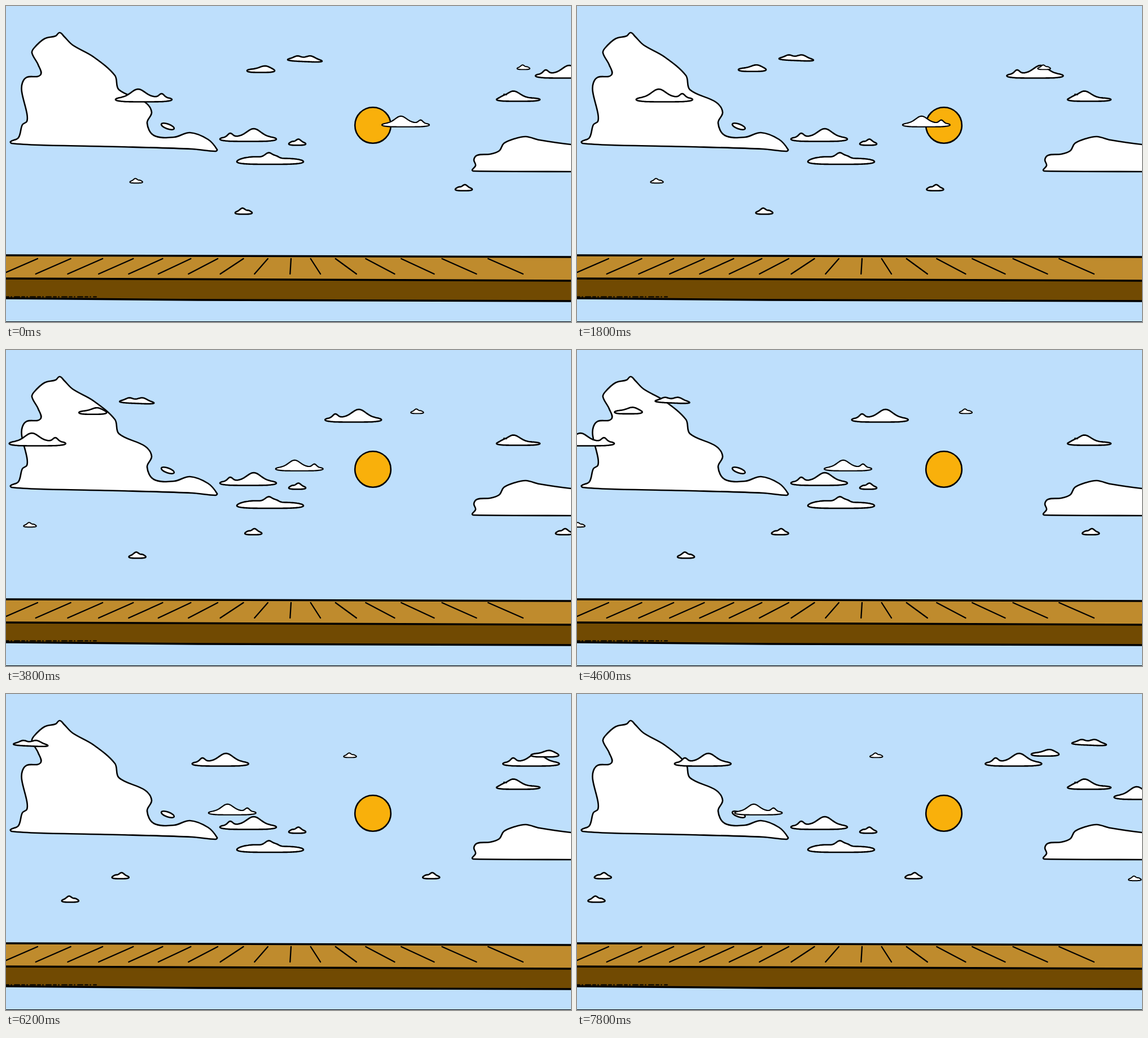
Animation, 1001 px wide and 559 px high, one loop 8 s. Source, as an HTML page:

```html
<!DOCTYPE html>
<html lang="en">
<head>
<meta charset="utf-8">
<title>Drifting clouds</title>
<style>
  html, body { margin: 0; width: 100%; height: 100%; overflow: hidden; background: #bedffc; }
  svg { display: block; width: 100%; height: 100%; }
</style>
</head>
<body>
<svg id="stage" viewBox="0 0 1001 559" fill="#fff" stroke="#000" stroke-width="2.6"
  stroke-linecap="round" stroke-linejoin="round"></svg>
<script>
const LOOP = 8000, STEP = 200;

// Small clouds: a slab `rim` above and `sag` below its base line, plus bumps [centre, height, spread].
const kinds = {
  twin: { width: 100, rim: 4.5, sag: 4, bumps: [[18, 7, 6], [60, 14, 17]] },
  puff: { width: 30, rim: 3, sag: 2.2, bumps: [[6, 1.5, 4], [17, 5.5, 6]] },
  flat: { width: 118, rim: 6, sag: 4.5, bumps: [[28, 3, 30], [57, 9, 9], [70, 3, 6]] },
  hat: { width: 77, rim: 3, sag: 3, bumps: [[10, 2, 7], [30, 12, 16]] },
  sliver: { width: 49, rim: 3, sag: 3, bumps: [[32, 5.5, 13]] },
  ribbon: { width: 61, rim: 3, sag: 2, bumps: [[17, 4.5, 9], [40, 5.5, 11]] }
};

function cloudPath({ width, rim, sag, bumps }) {
  const top = [], bottom = [], count = 60;
  for (let i = 0; i <= count; i++) {
    const u = -Math.cos(Math.PI * i / count);
    const x = width * (1 + u) / 2;
    const rise = bumps.reduce((sum, [c, h, s]) => sum + h * Math.exp(-(((x - c) / s) ** 2)), rim);
    const taper = Math.sqrt(Math.max(0, 1 - u ** 4));
    top.push([x.toFixed(1), (-rise * taper).toFixed(1)]);
    bottom.unshift([x.toFixed(1), (sag * taper).toFixed(1)]);
  }
  return `M${top.concat(bottom).join('L')}Z`;
}

// Puts the left end of a cloud's base line at (x, y).
function cloud(kind, x, y, { scale = 1, flip = false, tilt = 0 } = {}) {
  const left = flip ? x + scale * kinds[kind].width : x;
  const transform = `translate(${left} ${y}) rotate(${tilt}) scale(${flip ? -scale : scale} ${scale})`;
  return `<path transform="${transform}" d="${cloudPath(kinds[kind])}"/>`;
}

// Closed curve through a few points; handles follow the length of each segment.
function smooth(text) {
  const pts = text.split(' ').map(p => p.split(',').map(Number));
  const at = i => pts[(i + pts.length) % pts.length];
  const dist = (p, q) => Math.hypot(q[0] - p[0], q[1] - p[1]);
  const handle = (i, length) => {
    const a = at(i - 1), b = at(i + 1), k = length / 3 / dist(a, b);
    return at(i).map((v, n) => v + (b[n] - a[n]) * k);
  };
  const curves = pts.map((p, i) => {
    const q = at(i + 1), length = dist(p, q);
    return `C${handle(i, length)} ${handle(i + 1, -length)} ${q}`;
  });
  return `<path d="M${pts[0]}${curves.join('')}Z"/>`;
}

const tower = smooth('8,240 22,233 29,210 37,204 37,190 28,152 29,136 37,126 61,122 57,104 ' +
  '46,83 50,74 68,58 88,53 95,47 103,54 118,69 155,90 193,123 200,148 246,170 258,188 250,207 ' +
  '262,229 298,232 326,224 358,236 374,254 371,257 330,253 200,249 60,246 10,243');
const bank = smooth('826,290 832,282 829,272 835,264 858,262 874,256 882,243 900,235 921,231 ' +
  '945,237 1010,246 1080,250 1080,293 1010,293 828,292');

const scenery = `<rect width="1001" height="559" fill="#bedffc" stroke="none"/>` +
  tower + bank +
  '<ellipse rx="12" ry="4.2" transform="translate(286.5 213) rotate(20)"/>' +
  '<circle cx="650" cy="211" r="31.8" fill="#f9b00b"/>' +
  cloud('hat', 869, 165.5) + '<path d="M882 156l5 1" stroke-width="2"/>' +
  cloud('flat', 409, 275.5) + cloud('twin', 379, 235.5) + cloud('puff', 501, 244);

// Each layer drifts by (vx, vy) per step and repeats once at offset (dx, dy).
const layers = [
  { id: 'near', vx: -19.62, vy: 0, dx: 550.5, dy: 0,
    art: cloud('twin', 938, 123.5) + cloud('puff', 796, 324.5) },
  { id: 'far', vx: -9.91, vy: 0, dx: 1144, dy: 17,
    art: cloud('twin', 194, 165.5, { flip: true }) +
         cloud('twin', 666, 210.4, { flip: true, scale: .84 }) +
         cloud('puff', 406, 366, { flip: true }) +
         cloud('puff', 219.5, 311.5, { flip: true, scale: .75 }) +
         cloud('puff', 905.5, 110.7, { flip: true, scale: .75 }) },
  { id: 'mid', vx: -15.67, vy: -.2, dx: 989, dy: 0,
    art: cloud('sliver', 427, 114.5) + cloud('ribbon', 499, 95, { tilt: 2.5 }) }
];

// Board gaps spread out from the middle and lean towards a vanishing point.
function boardGaps() {
  let d = '';
  for (let k = -9; k <= 6; k++) {
    const x = 505 + (k < 0 ? 40 * k - 1.1 * k * k : 30 * k + 4.7 * k * k);
    const lean = 62 * Math.tanh((x - 508) / 110);
    d += `M${x} 447L${x + lean} 474`;
  }
  return d;
}

const deck = `<g fill="none">
  <path d="M0 441L1001 444V486L0 482Z" fill="#bf8b2d" stroke="none"/>
  <path d="M0 482L1001 486V522L340 520 0 517Z" fill="#714a02" stroke="none"/>
  <path d="M-3 441L1004 444M-3 482L1004 486M-3 517L340 520 1004 522" stroke-width="3.4"/>
  <path d="M0 514.5H160" stroke-width="2" stroke-dasharray="5 4 1 5 9 4"/>
  <path d="${boardGaps()}" stroke-width="2.3"/>
  <path d="M0 558.5H1001" stroke-width="1"/>
</g>`;

const stage = document.getElementById('stage');
stage.innerHTML = scenery + layers.map(({ id, art, dx, dy }) =>
  `<g id="${id}"><g id="${id}-art">${art}</g><use href="#${id}-art" x="${dx}" y="${dy}"/></g>`
).join('') + deck;
for (const layer of layers) layer.node = document.getElementById(layer.id);

function draw(time) {
  const step = Math.floor((time % LOOP) / STEP);
  for (const { node, vx, vy } of layers) {
    node.setAttribute('transform', `translate(${(vx * step).toFixed(2)} ${(vy * step).toFixed(2)})`);
  }
}

const start = performance.now();
function tick() {
  draw(performance.now() - start);
  requestAnimationFrame(tick);
}
tick();
</script>
</body>
</html>
```
